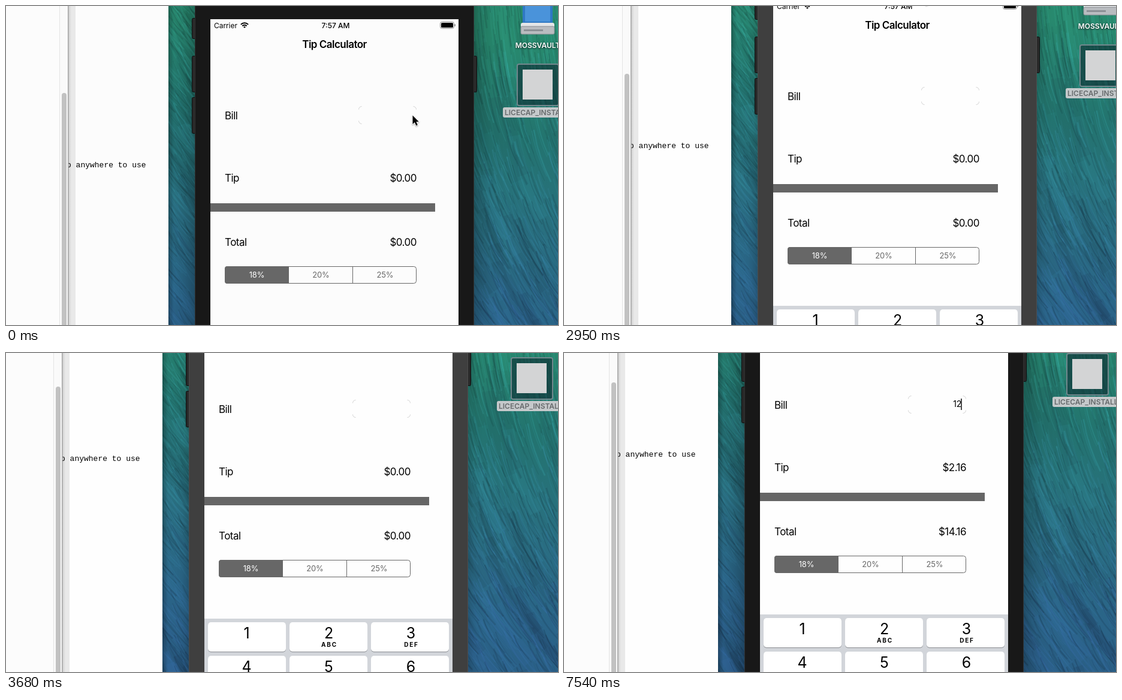
Write an HTML page with a canvas that moves like this. It is 921 px wide and 532 px high and loops after 7.99 s.

```html
<!DOCTYPE html>
<html lang="en">
<head>
<meta charset="utf-8">
<title>Tip Calculator</title>
<style>
  html, body { margin: 0; width: 100%; height: 100%; overflow: hidden; background: #fcfcfc; }
  canvas { display: block; }
</style>
</head>
<body>
<canvas id="stage" width="921" height="532"></canvas>
<script>
const W = 921, H = 532, LOOP = 7990, TICK = 147.8;
const ctx = document.getElementById('stage').getContext('2d');
const SANS = 'Inter, "Open Sans", sans-serif';
const MONO = '"Liberation Mono", "DejaVu Sans Mono", monospace';
const GREY = '#676767';

// Key points: [tick, x, y]
const PAN = [[17, 0, 0], [20, 8, -32], [23, -1, -76], [26, -14, -96]];
const POINTER = [[0, 678, 182], [2, 669, 182], [5, 666, 176], [9, 666, 180], [11, 652, 192],
  [13, 625, 71], [17, 598, -16], [27, 598, -25], [31, 577, 271], [36, 404, 470],
  [39, 404, 470], [41, 511, 462], [49, 524, 485]];

const clamp = v => Math.max(0, Math.min(1, v));

function along(keys, n) {
  let i = 0;
  while (i < keys.length - 2 && keys[i + 1][0] <= n) i++;
  const [t0, x0, y0] = keys[i], [t1, x1, y1] = keys[i + 1];
  const u = clamp((n - t0) / (t1 - t0));
  return [Math.round(x0 + (x1 - x0) * u), Math.round(y0 + (y1 - y0) * u)];
}

// The caret shows for half a blink, then fades
function caretAlpha(n) {
  return n < 4 ? 0 : clamp(4.4 - Math.min(n, 51) % 6.8);
}

function rect(x, y, w, h, fill, c = ctx) {
  c.fillStyle = fill;
  c.fillRect(x, y, w, h);
}

function round(x, y, w, h, r, fill, stroke, line = 1) {
  ctx.beginPath();
  ctx.roundRect(x, y, w, h, r);
  if (fill) { ctx.fillStyle = fill; ctx.fill(); }
  if (stroke) { ctx.strokeStyle = stroke; ctx.lineWidth = line; ctx.stroke(); }
}

function text(s, x, y, size, { align = 'left', color = '#000', weight = 400, track = 0, face = SANS } = {}) {
  ctx.font = `${weight} ${size}px ${face}`;
  ctx.letterSpacing = track * size + 'px';
  ctx.textAlign = align;
  ctx.fillStyle = color;
  ctx.fillText(s, x, y);
}

function shade(x, w, alpha) {
  const g = ctx.createLinearGradient(x, 0, x + w, 0);
  g.addColorStop(0, `rgba(0,0,0,${alpha})`);
  g.addColorStop(1, 'rgba(0,0,0,0)');
  rect(x, 0, w, 660, g);
}

// Sea-toned backdrop, painted once
const SEA_X = 260;
const sea = (() => {
  const el = document.createElement('canvas');
  el.width = 700;
  el.height = 640;
  const c = el.getContext('2d');
  let seed = 11;
  const rnd = () => (seed = seed * 16807 % 2147483647) / 2147483647;
  const g = c.createLinearGradient(0, 0, -60, 640);
  ['#288a6e', '#23746f', '#296f80', '#2a6488', '#295a83'].forEach((col, i) => g.addColorStop(i / 4, col));
  rect(0, 0, 700, 640, g, c);

  function streak(width, alpha) {
    const right = rnd() < .75;
    const x = right ? 450 + rnd() * 250 : rnd() * 80 - 20;
    const y = rnd() * 720 - 80, len = 25 + rnd() * 50 + width * 5;
    const depth = clamp(y / 500), lean = right ? .1 + .55 * depth : .7;
    const hue = 165 + 42 * depth + rnd() * 8;
    c.strokeStyle = `hsla(${hue}, 50%, ${rnd() < .5 ? 19 : 46}%, ${alpha})`;
    c.lineWidth = width;
    c.beginPath();
    c.moveTo(x, y);
    c.quadraticCurveTo(x + len * lean * .25, y + len * .5, x + len * lean, y + len);
    c.stroke();
  }
  for (let i = 0; i < 70; i++) streak(8 + rnd() * 14, .12);
  for (let i = 0; i < 1500; i++) streak(.8 + rnd() * 2, .1 + rnd() * .18);
  return el;
})();

function drawIcons() {
  // Disk
  rect(862, -10, 50, 40, '#2f78c4');
  rect(866, -10, 42, 36, '#4a93da');
  round(859, 28, 56, 10, 3, '#e4e6e8');
  round(859, 34, 56, 13, 2, '#b9bcc0', '#888d92');
  rect(864, 39, 32, 3, '#8b9095');
  ctx.save();
  ctx.shadowColor = 'rgba(0,0,0,.8)';
  ctx.shadowBlur = 3;
  ctx.shadowOffsetY = 1;
  text('MOSSVAULT', 887, 70, 12, { align: 'center', color: '#fff', weight: 600 });
  ctx.restore();
  // Selected file
  round(853, 97, 69, 69, 3, 'rgba(14,44,50,.6)', '#71878c', 2);
  rect(862, 106, 50, 50, '#d3d4d5');
  round(829, 169, 117, 17, 3, '#c5c9cb');
  text('LICECAP_INSTALL', 832, 182, 12, { color: '#666a6c', weight: 600 });
}

function drawEditor(paper) {
  rect(-20, 0, 291, 660, paper);
  rect(-20, 0, 109, 660, '#fcfcfc');
  rect(89, 0, 1, 660, '#e4e4e4');
  rect(90, 0, 13, 660, '#fafafa');
  round(93, 145, 8, 560, 4, '#c2c2c2');
  ctx.save();
  ctx.beginPath();
  ctx.rect(103, 0, 168, 660);
  ctx.clip();
  rect(104, 0, 12, 660, '#e9e9e9');
  shade(104, 5, .12);
  text('p anywhere to use', 101, 269, 13, { face: MONO });
  ctx.restore();
  rect(103, 0, 1.5, 660, '#a6a6a6');
}

function drawBody(active) {
  const edge = active ? '#303030' : '#4c4c4c';
  ctx.save();
  ctx.beginPath();
  ctx.rect(271, -10, 700, 680);
  ctx.clip();
  ctx.shadowColor = active ? 'rgba(0,0,0,.5)' : 'rgba(0,0,0,.35)';
  ctx.shadowBlur = active ? 42 : 20;
  ctx.shadowOffsetY = 12;
  rect(315, -60, 466, 900, '#181818');
  ctx.restore();
  for (const [x, y, h] of [[310.5, 20, 34], [310.5, 83, 60], [310.5, 152, 60], [776.5, 83, 60]])
    round(x, y + .5, 9, h, 2, '#292929', '#0d0d0d');
  rect(315, -10, 466, 680, edge);
  rect(316, -10, 464, 680, active ? '#181818' : '#3f3f3f');
}

function drawStatus() {
  text('Carrier', 347, 37, 12, { track: -.005 });
  text('7:57 AM', 550, 37, 12, { align: 'center', weight: 500 });
  // Signal
  ctx.strokeStyle = '#000';
  ctx.lineWidth = 2;
  for (const r of [1.8, 5.3, 8.7]) {
    ctx.beginPath();
    ctx.arc(398, 37, r, -Math.PI * .75, -Math.PI * .25);
    ctx.stroke();
  }
  // Battery
  round(724.5, 26.5, 23, 11, 3, null, '#8a8a8a');
  round(726, 28, 20, 8, 1.5, '#000');
  round(748.5, 30, 1.5, 4, 1, '#8a8a8a');
}

function drawField(bill, caret) {
  // Only the corners of the border show
  ctx.strokeStyle = '#d4d4d4';
  ctx.lineWidth = 1;
  for (let q = 0; q < 4; q++) {
    const a = q * Math.PI / 2, mid = a + Math.PI / 4;
    ctx.beginPath();
    ctx.arc(636.5 + 43 * Math.sign(Math.cos(mid)), 182 + 9.5 * Math.sign(Math.sin(mid)), 5, a, a + Math.PI / 2);
    ctx.stroke();
  }
  text(bill, 677, 186, 14, { align: 'right', track: -.02 });
  ctx.globalAlpha = caret;
  rect(676, 172, 2, 19, '#4c4c4c');
  ctx.globalAlpha = 1;
}

function drawTabs() {
  round(365.5, 434.5, 319, 28, 4, null, GREY);
  round(365, 434, 107, 29, [4, 0, 0, 4], GREY);
  rect(578, 434, 1, 29, GREY);
  ['18%', '20%', '25%'].forEach((s, i) =>
    text(s, 418.5 + i * 107, 453, 13, { align: 'center', color: i ? GREY : '#fff', track: -.01 }));
}

function drawKeys(pressed) {
  rect(341, 532, 414, 140, '#d2d5da');
  const letters = ['', 'ABC', 'DEF'];
  for (let i = 0; i < 6; i++) {
    const col = i % 3, x = 347 + col * 136, y = 538 + Math.floor(i / 3) * 56;
    const mid = x + 64.5 + col;
    round(x, y + 1, 130, 49, 5, '#8a8d92');
    round(x, y, 130, 49, 5, pressed === i + 1 ? '#b6c1d0' : '#fff');
    text(String(i + 1), mid, y + 26.5, 25, { align: 'center' });
    if (i < 3) text(letters[i], mid + 1, y + 41, 10, { align: 'center', weight: 700, track: .18 });
  }
}

function drawPointer(x, y) {
  ctx.save();
  ctx.translate(x + .5, y + .5);
  ctx.shadowColor = 'rgba(0,0,0,.35)';
  ctx.shadowBlur = 2;
  ctx.shadowOffsetY = 1;
  ctx.lineJoin = 'round';
  ctx.lineWidth = 2;
  ctx.strokeStyle = '#fff';
  const arrow = new Path2D('M0 0V14.5L3.4 11.4L5.8 17L8.3 16L6 10.6H10.3Z');
  ctx.stroke(arrow);
  ctx.shadowColor = 'transparent';
  ctx.fillStyle = '#000';
  ctx.fill(arrow);
  ctx.restore();
}

function draw(t) {
  const n = Math.floor(t / TICK + .2);
  const active = n < 18 || n >= 38;
  const paper = n < 18 ? '#fcfcfc' : '#fefefe';
  const bill = n < 42 ? '' : n < 44 ? '1' : '12';
  const tip = bill * .18, total = +bill + tip;
  const pressed = n >= 39 && n <= 41 ? 1 : n === 43 ? 2 : 0;
  const money = v => '$' + v.toFixed(2);
  const body = { track: -.03 }, sum = { track: -.03, align: 'right' };

  ctx.setTransform(1, 0, 0, 1, 0, 0);
  ctx.clearRect(0, 0, W, H);
  ctx.translate(...along(PAN, n));
  ctx.drawImage(sea, SEA_X, 0);
  drawIcons();
  drawEditor(paper);
  shade(271, 9, .28);
  drawBody(active);
  rect(341, 22, 414, 640, paper);
  drawStatus();
  text('Tip Calculator', 548, 70, 17, { align: 'center', weight: 600, track: -.03 });
  text('Bill', 365, 189, 17, body);
  drawField(bill, caretAlpha(n));
  text('Tip', 365, 293, 17, body);
  text(money(tip), 685, 293, 17, sum);
  rect(341, 329, 375, 14, '#666');
  text('Total', 365, 400, 17, body);
  text(money(total), 685, 400, 17, sum);
  drawTabs();
  drawKeys(pressed);

  ctx.setTransform(1, 0, 0, 1, 0, 0);
  if (n < 50) drawPointer(...along(POINTER, n));
}

const start = performance.now();
function loop() {
  draw((performance.now() - start) % LOOP);
  requestAnimationFrame(loop);
}
loop();
</script>
</body>
</html>
```
